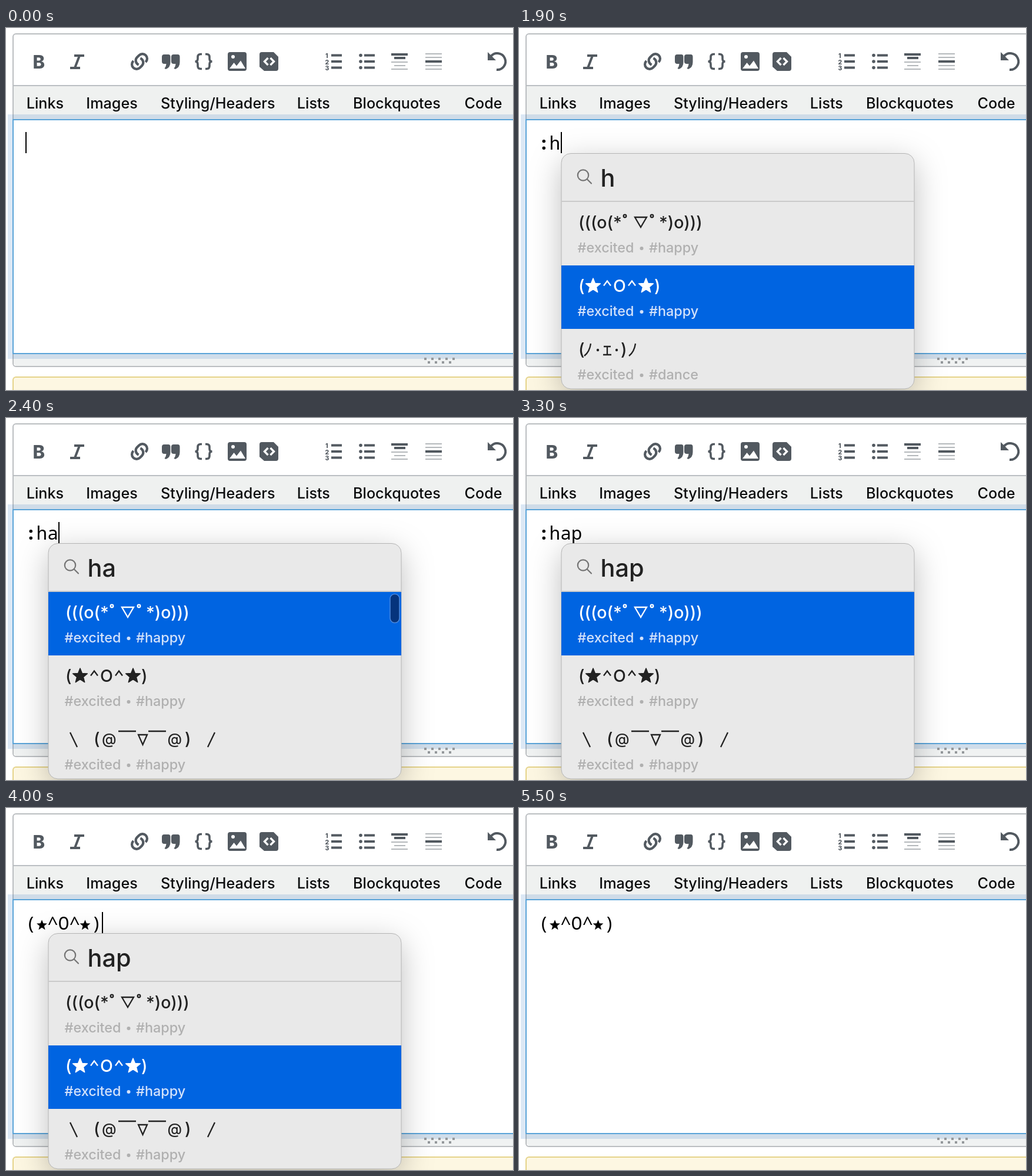
An HTML page for the animation above (5.58 s loop, 862 px wide and 616 px high).

```html
<!DOCTYPE html>
<html lang="en">
<head>
<meta charset="utf-8">
<title>Kaomoji picker</title>
<style>
  html, body { margin: 0; width: 100%; height: 100%; overflow: hidden; background: #fff; }
  svg { display: block; width: 100%; height: 100%; }
  text { white-space: pre; font-family: Inter, sans-serif; font-weight: 450; font-feature-settings: "calt" 0; }

  .tabs { font-size: 25.2px; fill: #0c0d0e; }
  .mono text { font: 31px "Noto Sans Mono", monospace; }
  .mono .colon { font-weight: 800; }
  .query text { font-size: 41.5px; font-weight: 500; fill: #222; }
  .icons { fill: #525960; }
  .icons text { font-weight: 800; }
  .line { fill: none; stroke: #525960; }
  .thin { stroke: #b4b8bb; stroke-width: 2; }

  .row { --face: #222; --tag: #b0b0b0; }
  .face { font-size: 28.5px; fill: var(--face); }
  .face .line { stroke: var(--face); stroke-width: 2.3; }
  .face use { stroke: var(--face); stroke-width: 1.5; stroke-linejoin: round; }
  .tag { font-size: 23.4px; fill: var(--tag); }

  /* One 5580 ms timeline; every change is a hard step. */
  .t { animation: 5580ms step-end -15ms infinite; }
  .caret { animation-name: caret; }
  .typed { animation-name: typed; }
  .colon { animation-name: colon; }
  .h { animation-name: h; }
  .a { animation-name: a; }
  .p { animation-name: p; }
  .result { animation-name: result; }
  .popup { animation-name: popup; }
  .pick { animation-name: pick; }
  .row1 { animation-name: row1; }
  .row2 { animation-name: row2; }
  .before { animation-name: before; }
  .scroll { animation-name: scroll; }

  @keyframes caret {
    0% { transform: none; opacity: 1; }
    19.71% { transform: translateX(20px); opacity: 1; }
    28.67% { transform: translateX(20px); opacity: 0; }
    32.26% { transform: translateX(38px); opacity: 1; }
    43.01% { transform: translateX(56px); opacity: 1; }
    53.76% { transform: translateX(74px); opacity: 1; }
    55.56% { transform: translateX(74px); opacity: 0; }
    64.52% { transform: translateX(74px); opacity: 1; }
    70.79% { transform: none; opacity: 1; }
    71.68% { transform: translateX(130px); opacity: 1; }
    80.65% { transform: translateX(130px); opacity: 0; }
    89.61% { transform: translateX(130px); opacity: 1; }
    98.57%, to { transform: translateX(130px); opacity: 0; }
  }
  @keyframes typed { 0% { opacity: 1; } 70.79%, to { opacity: 0; } }
  @keyframes colon { 0% { opacity: 0; } 19.71%, to { opacity: 1; } }
  @keyframes h { 0% { opacity: 0; } 32.26%, to { opacity: 1; } }
  @keyframes a { 0% { opacity: 0; } 43.01%, to { opacity: 1; } }
  @keyframes p { 0% { opacity: 0; } 53.76%, to { opacity: 1; } }
  @keyframes before { 0% { opacity: 1; } 43.01%, to { opacity: 0; } }
  @keyframes result { 0% { opacity: 0; } 71.68%, to { opacity: 1; } }
  @keyframes popup { 0% { opacity: 0; } 33.15% { opacity: 1; } 74.37%, to { opacity: 0; } }
  @keyframes pick {
    0% { transform: translateY(108px); }
    36.74% { transform: none; }
    60.04%, to { transform: translateY(108px); }
  }
  @keyframes row1 {
    0% { --face: #222; --tag: #b0b0b0; }
    36.74% { --face: #fff; --tag: #d3e2fa; }
    60.04%, to { --face: #222; --tag: #b0b0b0; }
  }
  @keyframes row2 {
    0% { --face: #fff; --tag: #d3e2fa; }
    36.74% { --face: #222; --tag: #b0b0b0; }
    60.04%, to { --face: #fff; --tag: #d3e2fa; }
  }
  @keyframes scroll {
    0% { opacity: 0; }
    36.74% { opacity: 1; } 38.53% { opacity: .7; } 39.43% { opacity: .35; } 40.32% { opacity: 0; }
    43.01% { opacity: 1; } 44.8% { opacity: .75; } 45.7% { opacity: .5; } 46.59% { opacity: .25; } 47.49% { opacity: 0; }
    53.76% { opacity: 1; } 54.66% { opacity: .7; } 55.56% { opacity: .35; } 56.45%, to { opacity: 0; }
  }
</style>
</head>
<body>
<svg viewBox="0 0 862 616">
  <defs>
    <path id="star" d="M0-13 3.4-4.4 12.4-4 5.4 1.8 7.7 10.6 0 5.6-7.7 10.6-5.4 1.8-12.4-4-3.4-4.4Z"/>
    <path id="hook" d="M6.5 8H7A8 8 0 0 0 7-8H2A8 8 0 0 0-5 3" class="line" stroke-width="4.2"/>
    <path id="quote" d="M4 45h7q3.5 0 3.5 4v9q0 9-7.5 12l-2.5-1q3-4 3-8H4q-4 0-4-4v-8q0-4 4-4Z"/>
    <path id="brace" d="M-3 44.5h-2q-5 0-5 5v3q0 4.5-4.500 4.500q4.500 0 4.500 4.500v3q0 5 5 5h2" class="line" stroke-width="3.6"/>
    <path id="bars" d="M0 46.5h18M0 57h18M0 67.5h18" class="line" stroke-width="4"/>
    <g id="happy" class="tag">
      <text x="99.5" y="382">#excited</text><circle cx="208.5" cy="375" r="3"/><text x="221" y="382">#happy</text>
    </g>
  </defs>

  <!-- editor frame -->
  <rect x="12" y="10" width="900" height="566" rx="5" fill="#fff"/>
  <path d="M13 98H862V156H13Z" fill="#eff1f0"/>
  <path d="M13 554H862V575H17L13 571Z" fill="#f0f2f2"/>
  <path d="M13 98H862" stroke="#bbbfc3" stroke-width="2"/>
  <rect x="12" y="10" width="900" height="566" rx="5" fill="none" stroke="#bbbec1" stroke-width="2"/>
  <rect x="12" y="156" width="900" height="398" fill="#fff"/>
  <rect x="7.5" y="151.5" width="900" height="407" fill="none" stroke="#1464be" stroke-opacity=".15" stroke-width="9"/>
  <rect x="12" y="156" width="900" height="398" fill="none" stroke="#5aa4d8" stroke-width="2"/>
  <path d="M711 563H764M717 569H758" stroke="#94989b" stroke-width="4" stroke-dasharray="4 8"/>
  <rect x="12" y="594" width="900" height="60" rx="5" fill="#fdf7e2" stroke="#e5d389" stroke-width="2"/>

  <!-- toolbar -->
  <g class="icons">
    <text x="45.5" y="69" font-size="31">B</text>
    <path d="M116 47H133M109 68H126M125 47L117 68" class="line" stroke-width="4"/>
    <g transform="translate(227 57) rotate(-45)"><use href="#hook"/><use href="#hook" transform="rotate(180)"/></g>
    <use href="#quote" x="265"/><use href="#quote" x="281"/>
    <use href="#brace" x="336"/><use href="#brace" transform="translate(336) scale(-1 1)"/>
    <rect x="377" y="41" width="32" height="32" rx="4"/>
    <circle cx="386" cy="49" r="3" fill="#fff"/>
    <path d="M380 69 387.5 59 392 64.5 399 55.5 407 69Z" fill="#fff"/>
    <path d="M435 41H455L463 49V69Q463 73 459 73H439L431 66V45Q431 41 435 41Z"/>
    <path d="M445.5 51 439.5 57 445.5 63M449.5 51 455.5 57 449.5 63" fill="none" stroke="#fff" stroke-width="3.4"/>
    <g font-size="10.5">
      <text x="543" y="51">1</text><text x="542.5" y="61.5">2</text><text x="542.5" y="71.5">3</text>
    </g>
    <use href="#bars" x="553"/>
    <use href="#bars" x="609"/>
    <circle cx="603" cy="46.5" r="2.8"/><circle cx="603" cy="57" r="2.8"/><circle cx="603" cy="67.5" r="2.8"/>
    <path d="M655 45H683M660 51H679" class="line" stroke-width="4"/>
    <path d="M655 58H683M660 64H679M655 70H683" class="thin"/>
    <path d="M713 44H741M713 50H741M713 64H741M713 70H741" class="thin"/>
    <path d="M713 57H741" class="line" stroke-width="4"/>
    <path d="M834 71A14 14 0 1 0 824.5 48" class="line" stroke-width="4"/>
    <path d="M819 41V55H833Z"/>
  </g>
  <g class="tabs">
    <text x="34.7" y="137">Links</text>
    <text x="136.3" y="137">Images</text>
    <text x="263" y="137">Styling/Headers</text>
    <text x="494.8" y="137">Lists</text>
    <text x="590" y="137">Blockquotes</text>
    <text x="779.5" y="137">Code</text>
  </g>

  <!-- typed text -->
  <g class="mono">
    <g class="t typed">
      <text x="33" y="207" class="t colon">:</text>
      <text x="51.6" y="207" class="t h">h</text>
      <text x="70.2" y="207" class="t a">a</text>
      <text x="88.8" y="207" class="t p">p</text>
    </g>
    <g class="t result">
      <text x="33" y="207">( ^O^ )</text>
      <use href="#star" transform="translate(61 199.5) scale(.72)"/>
      <use href="#star" transform="translate(134.5 199.5) scale(.72)"/>
    </g>
  </g>
  <rect class="t caret" x="33" y="177" width="2" height="36"/>

  <!-- suggestions -->
  <g class="t popup">
    <rect x="72" y="213.5" width="600" height="400.5" rx="16" fill="#e9e9e9" stroke="#b4b4b4"
          style="filter: drop-shadow(0 14px 26px rgba(0, 0, 0, .25))"/>
    <path d="M72 295H672" stroke="#cacaca" stroke-width="2"/>
    <g fill="none" stroke="#747474" stroke-width="2.2" stroke-linecap="round">
      <circle cx="109" cy="250.5" r="9.2"/><path d="M116 257.5 123 264.5"/>
    </g>
    <g class="query">
      <text x="138.500" y="269.5">h</text>
      <text x="138.500" y="269.5" class="t a"><tspan fill="none">h</tspan>a</text>
      <text x="138.500" y="269.5" class="t p"><tspan fill="none">ha</tspan>p</text>
    </g>
    <rect class="t pick" x="72" y="296" width="600" height="108" fill="#0064e1"/>

    <g class="row t row1">
      <g class="face">
        <text x="101" y="341">(((o(*</text><text x="238" y="341">*)o)))</text>
        <path d="M197 322H217L207 339Z" class="line"/>
        <circle cx="180" cy="320" r="2.3" class="line"/><circle cx="226" cy="320" r="2.3" class="line"/>
      </g>
      <use href="#happy"/>
    </g>

    <g class="row t row2">
      <g class="face">
        <text x="101" y="449">(</text><text x="171" y="449" text-anchor="middle">O</text><text x="230" y="449">)</text>
        <path d="M144 438.5 150 430.5 156 438.5M186 438.5 192 430.5 198 438.5" class="line"/>
        <use href="#star" x="126" y="439"/><use href="#star" x="216" y="439"/>
      </g>
      <use href="#happy" y="108"/>
    </g>

    <g class="row t before">
      <g class="face">
        <text x="101" y="557">(</text><text x="173" y="557">)</text>
        <path d="M122 537Q120 551 111 558M198 537Q196 551 187 558M144 542H156M150 542V556M143 556H157" class="line"/>
        <circle cx="134" cy="548" r="2.2"/><circle cx="166" cy="548" r="2.2"/>
      </g>
      <g class="tag">
        <text x="99.5" y="598">#excited</text><circle cx="208.5" cy="591" r="3"/><text x="221" y="598">#dance</text>
      </g>
    </g>

    <g class="row t a">
      <g class="face">
        <text x="149" y="556">(</text><text x="304" y="556">)</text>
        <g font-size="25"><text x="163" y="555">@</text><text x="274.5" y="555">@</text></g>
        <path d="M109 535 121 560M355 535 343 560M191 533H221M242 533H272M225 539H240L232.5 556Z" class="line"/>
      </g>
      <use href="#happy" y="216"/>
    </g>

    <rect class="t scroll" x="653" y="299.5" width="16" height="49" rx="8" fill="#06347c" stroke="#4a88de" stroke-width="1.5"/>
  </g>
</svg>
</body>
</html>
```
